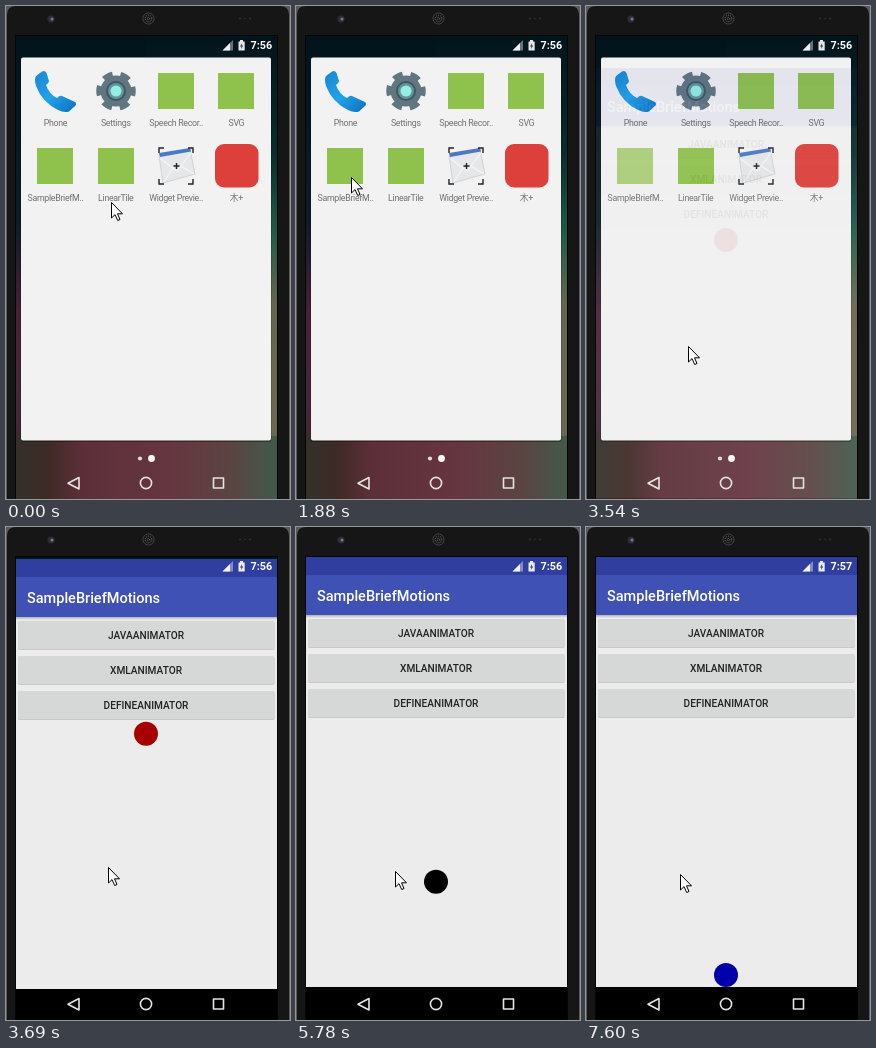
These frames come from a looping animation (284 px wide and 493 px high, 8 s). An HTML page:

```html
<!DOCTYPE html>
<html lang="en">
<head>
<meta charset="utf-8">
<title>Falling ball demo</title>
<style>
html, body { margin: 0; width: 100%; height: 100%; overflow: hidden; background: #141414; }
svg { display: block; width: 284px; height: 493px; font-family: Roboto, "Noto Sans CJK SC", sans-serif; }
.label { font-size: 8.8px; letter-spacing: -.3px; fill: #707070; text-anchor: middle; }
.button { font-size: 10.15px; font-weight: 500; fill: #222; text-anchor: middle; }
</style>
</head>
<body>
<svg viewBox="0 0 284 493">
  <defs>
    <clipPath id="screen"><rect x="10" y="30" width="261" height="463"/></clipPath>
    <linearGradient id="left" x2="0" y2="1">
      <stop offset="0" stop-color="#02141b"/><stop offset=".4" stop-color="#0c1d26"/>
      <stop offset=".6" stop-color="#4a2038"/><stop offset=".8" stop-color="#45283a"/>
      <stop offset="1" stop-color="#33261f"/>
    </linearGradient>
    <linearGradient id="right" x2="0" y2="1">
      <stop offset="0" stop-color="#02141b"/><stop offset=".25" stop-color="#0a2c2c"/>
      <stop offset=".42" stop-color="#1f5a49"/><stop offset=".58" stop-color="#66664e"/>
      <stop offset=".85" stop-color="#6b6850"/><stop offset="1" stop-color="#40604c"/>
    </linearGradient>
    <linearGradient id="floor">
      <stop offset="0" stop-color="#33302a"/><stop offset=".12" stop-color="#3e2a26"/>
      <stop offset=".25" stop-color="#5c2f38"/><stop offset=".6" stop-color="#663640"/>
      <stop offset=".82" stop-color="#5b4442"/><stop offset="1" stop-color="#42594a"/>
    </linearGradient>
    <linearGradient id="blue" x2="1" y2="1">
      <stop offset="0" stop-color="#1687d2"/><stop offset=".5" stop-color="#22a2ea"/>
      <stop offset="1" stop-color="#0c6fc0"/>
    </linearGradient>
    <linearGradient id="drop" x2="0" y2="1">
      <stop offset="0" stop-color="#000" stop-opacity=".25"/><stop offset="1" stop-color="#000" stop-opacity="0"/>
    </linearGradient>
  </defs>

  <!-- phone body -->
  <rect width="284" height="493" fill="#5a5a5a"/>
  <path d="M1 493V9Q1 0 10 0H274Q283 0 283 9V493Z" fill="#161616"/>
  <circle cx="45" cy="13" r="3.6" fill="#2b2d33"/>
  <circle cx="46" cy="13" r="1.5" fill="#737a90"/>
  <g fill="none" stroke="#777" stroke-dasharray="1 1.1">
    <circle cx="142.5" cy="12.5" r="5.5"/><circle cx="142.5" cy="12.5" r="3.3"/><circle cx="142.5" cy="12.5" r="1.2"/>
  </g>
  <g fill="#333"><circle cx="234" cy="12.5" r="1"/><circle cx="239" cy="12.5" r=".8"/><circle cx="244" cy="12.5" r="1"/></g>
  <rect x="9" y="29" width="263" height="464" fill="#050505"/>

  <g clip-path="url(#screen)">
    <g id="launcher">
      <rect x="10" y="30" width="131" height="463" fill="url(#left)"/>
      <rect x="140" y="30" width="131" height="463" fill="url(#right)"/>
      <rect x="10" y="430" width="261" height="63" fill="url(#floor)"/>
      <rect x="14.5" y="52" width="251" height="384" rx="2" fill="#000" opacity=".35"/>
      <rect x="15" y="51.5" width="250" height="383" rx="2" fill="#f2f2f2"/>
      <circle cx="134" cy="452.5" r="2.1" fill="#ddd"/>
      <circle cx="145.5" cy="452.5" r="3.4" fill="#fff"/>

      <!-- handset -->
      <path d="M30 70L36 65.500Q39 64 40.500 67L43 75Q43 77 40 79Q43 88 51 92Q54 89 56 90L69 96Q71 98 69 100L63 105.500Q58 107 52 104Q36 96 30 80Q28 73 30 70Z" fill="url(#blue)"/>
      <!-- gear -->
      <circle cx="110" cy="85" r="16.5" fill="none" stroke="#607681" stroke-width="6.500" stroke-dasharray="9.500 7.780" stroke-dashoffset="4.750"/>
      <circle cx="110" cy="85" r="15.500" fill="#607681"/>
      <circle cx="110" cy="85" r="10" fill="#43565f"/>
      <circle cx="110" cy="85" r="8" fill="#62959a"/>
      <circle cx="110" cy="85" r="5.500" fill="#93eee4"/>

      <g fill="#8fc24c">
        <rect x="152" y="67" width="36" height="36"/>
        <rect x="212" y="67" width="36" height="36"/>
        <rect id="pressed" x="31" y="142" width="36" height="36"/>
        <rect x="92" y="142" width="36" height="36"/>
      </g>
      <!-- card in corner brackets -->
      <path d="M153 150L184 143L189 168L157 177Z" fill="#e6e7e8" stroke="#c6c8cb" stroke-width=".7"/>
      <path d="M153 147L184 142L185 145.500L154 151Z" fill="#4779c4"/>
      <path d="M155 153L171 165L185 147M158 176L167 162M188 168L175 160" fill="none" stroke="#f6f6f6" stroke-width="1.200"/>
      <path d="M153 147V142H158M182 142H187V147M153 173V178H158M182 178H187V173" fill="none" stroke="#222" stroke-width="1.400"/>
      <path d="M167.500 160H173.500M170.500 157V163" stroke="#222" stroke-width="1.400"/>
      <rect x="209" y="138" width="43.500" height="43.500" rx="9" fill="#dd3f3b"/>
    </g>

    <g id="app">
      <rect x="10" y="30" width="261" height="430" fill="#ececec"/>
      <rect x="10" y="30" width="261" height="18" fill="#303f9f"/>
      <rect x="10" y="48" width="261" height="40" fill="#3f51b5"/>
      <rect x="10" y="88" width="261" height="3" fill="url(#drop)"/>
      <text x="21" y="74" font-size="14.5" font-weight="500" fill="#fff">SampleBriefMotions</text>
      <g id="buttons"></g>
      <circle id="ball" cx="140" r="12"/>
      <rect x="10" y="460" width="261" height="40" fill="#000"/>
    </g>

    <!-- system bars -->
    <g fill="#fff">
      <path d="M216.500 44.500L227 34V44.500Z" opacity=".4"/>
      <path d="M216.500 44.500L224 37V44.500Z" opacity=".9"/>
      <path d="M232.500 35.500H234V34H237V35.500H238.700V44.500H232.500Z" opacity=".9"/>
    </g>
    <path d="M236.200 37L234 40.500H235.500L234.800 43.300L237.200 39.600H235.700Z" fill="#334"/>
    <text id="clock" x="244.500" y="43" font-size="10.8" font-weight="700" fill="#fff"></text>
    <g fill="none" stroke="#e4e4e4" stroke-width="1.6" stroke-linejoin="round">
      <path d="M73 471.500V483L62 477.200Z"/>
      <circle cx="140" cy="477" r="5.600"/>
      <rect x="207.500" y="472" width="10" height="10"/>
    </g>
  </g>

  <path id="cursor" d="M.5 .5V16L4 12.600L6.700 18.500L9 17.500L6.500 11.800H11.500Z" fill="#fff" stroke="#000"/>
</svg>
<script>
const $ = id => document.getElementById(id);
const LOOP = 8000, LAUNCH = 3530;

["Phone", "Settings", "Speech Recor..", "SVG", "SampleBriefM..", "LinearTile", "Widget Previe..", "木+"].forEach((name, i) => {
  const x = 49.5 + i % 4 * 60.3, y = i < 4 ? 120 : 195;
  $("launcher").innerHTML += `<text class="label" x="${x}" y="${y}">${name}</text>`;
});
["JAVAANIMATOR", "XMLANIMATOR", "DEFINEANIMATOR"].forEach((name, i) => {
  const y = 92 + i * 35;
  $("buttons").innerHTML += `<rect x="12" y="${y + .8}" width="256.500" height="28" rx="1.500" fill="#bdbebe"/>
    <rect x="12" y="${y}" width="256.500" height="28" rx="1.500" fill="#d6d7d7"/>
    <text class="button" x="140" y="${y + 17.6}">${name}</text>`;
});

// Screen refreshes: first time, last time, count
const runs = [[120, 240, 2], [670, 1640, 7], [1760, 1880, 2], [2190, 2620, 4], [3000, 3270, 3],
  [3540, 4550, 8], [4700, 5660, 8], [5780, 6790, 8], [6920, 7600, 6]];
const ticks = [0, ...runs.flatMap(([a, b, n]) => Array.from({ length: n }, (_, i) => a + (b - a) * i / (n - 1)))];

// Cursor: time, x, y
const path = [[0, 105, 196], [240, 104, 210], [540, 104, 210], [1640, 69, 194], [1880, 55, 171],
  [2070, 55, 171], [2620, 91, 311], [2870, 91, 311], [3270, 102, 340], [4700, 102, 340],
  [5660, 101, 342], [6000, 94, 347]];
// Ball: time, y, speed
const fall = [[3670, 202, .2], [4550, 316, .029], [4700, 320, .03], [5660, 351, .033], [6790, 388, .045], [7600, 448, .1]];

const clamp = (v, lo = 0, hi = 1) => Math.min(hi, Math.max(lo, v));

function segment(keys, t) {
  let i = 0;
  while (i < keys.length - 2 && t > keys[i + 1][0]) i++;
  const a = keys[i], b = keys[i + 1];
  return [a, b, clamp((t - a[0]) / (b[0] - a[0]))];
}

function ballY(t) {
  const [a, b, u] = segment(fall, t), d = b[0] - a[0], v = 1 - u;
  return v * v * (1 + 2 * u) * a[1] + u * u * (3 - 2 * u) * b[1] + d * u * v * (v * a[2] - u * b[2]);
}

function draw(now) {
  const time = now % LOOP;
  const t = ticks.findLast(tick => tick <= time);

  const [a, b, u] = segment(path, t);
  const [x, y] = [1, 2].map(k => Math.round(a[k] + (b[k] - a[k]) * u));
  $("cursor").setAttribute("transform", `translate(${x} ${y})`);

  $("pressed").setAttribute("opacity", t < 2190 ? 1 : .72);
  $("clock").textContent = t < 6100 ? "7:56" : "7:57";

  const shift = Math.round(37 * (1 - clamp((t - LAUNCH) / 350)) ** 5);
  $("app").setAttribute("transform", `translate(0 ${shift})`);
  $("app").setAttribute("opacity", clamp((t - LAUNCH) / 150));

  const cy = ballY(t);
  const red = 170 * clamp((318 - cy) / 116), blue = 170 * clamp((cy - 368) / 80);
  $("ball").setAttribute("cy", cy);
  $("ball").setAttribute("fill", `rgb(${Math.round(red)},0,${Math.round(blue)})`);
}

const start = performance.now();
(function frame() {
  draw(performance.now() - start);
  requestAnimationFrame(frame);
})();
</script>
</body>
</html>
```
